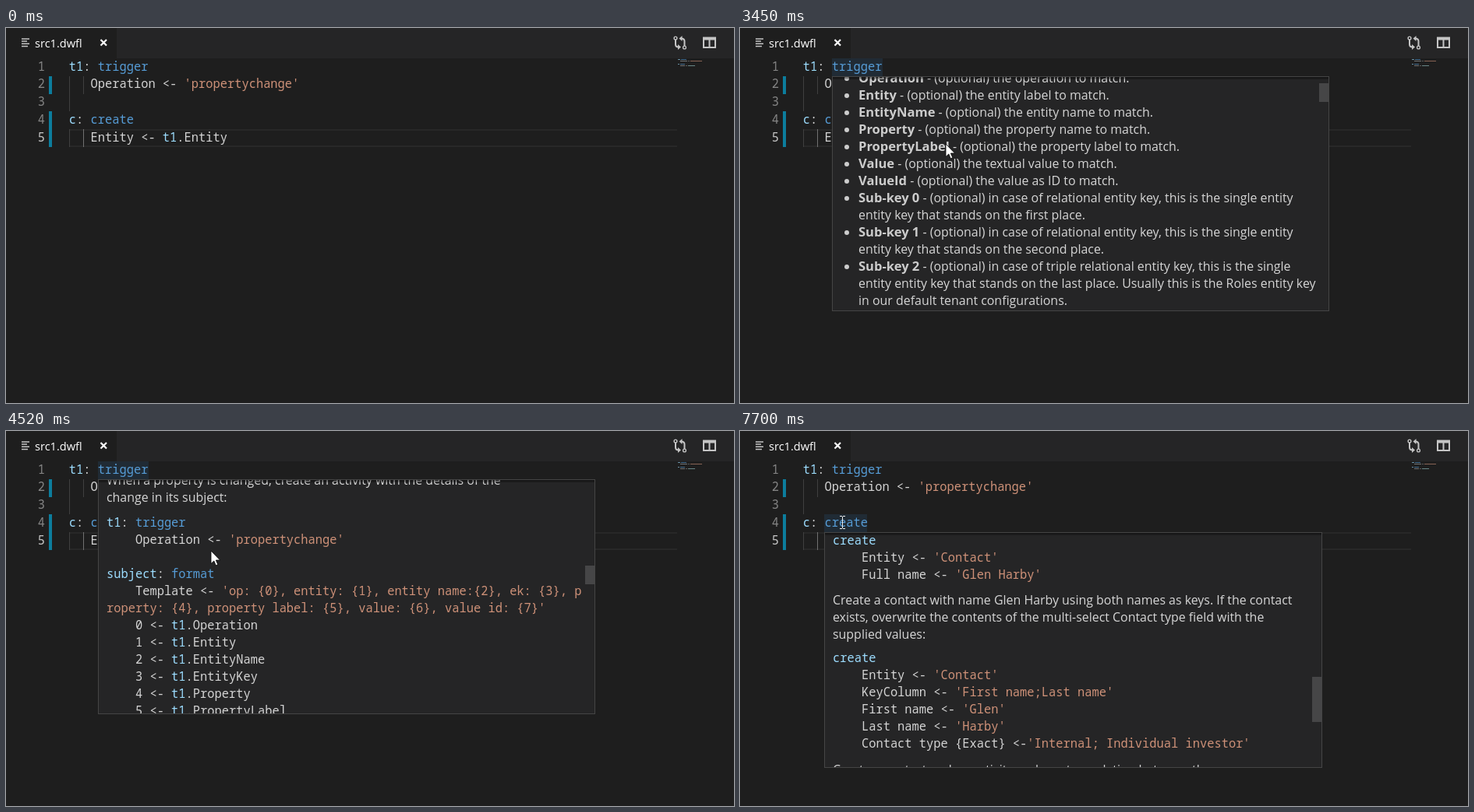
Write an HTML page that moves like this. It is 934 px wide and 482 px high and loops after 8000 ms.

```html
<!DOCTYPE html>
<html lang="en">
<head>
<meta charset="utf-8">
<title>Hover documentation</title>
<style>
html, body { margin: 0; width: 100%; height: 100%; overflow: hidden; background: #1e1e1e; }
#stage { position: relative; width: 934px; height: 482px; overflow: hidden; background: #1e1e1e; }
#stage div, #stage svg { position: absolute; }
.code { font: 500 15.4px/22px "Noto Sans Mono", monospace; color: #d4d4d4; white-space: pre; }
.row { line-height: 22.8px; }
.num { left: 20px; width: 30px; text-align: right; font-weight: 400; color: #858585; }
.num.on { color: #c6c6c6; }
.v { color: #9cdcfe; }
.k { color: #569cd6; }
.s { color: #ce9178; }
.ui { font: 15.93px/22px "Open Sans", "Noto Sans", sans-serif; color: #d6d6d6; white-space: pre; }
.ui b { font-size: 1.04em; line-height: 1; color: #ccc; }
.head { font-size: 18.4px; font-weight: 700; color: #ccc; }
.tab { left: 37px; top: 8px; font-size: 14.6px; color: #fff; }
.pop { box-sizing: border-box; background: #252526; border: 1px solid #454545; overflow: hidden; }
.shade { left: 0; top: 0; right: 0; height: 3px; box-shadow: #000 0 6px 6px -6px inset; }
.thumb { width: 12px; background: rgba(121, 121, 121, .4); }
.dot { width: 6px; height: 6px; border-radius: 50%; background: #ccc; }
</style>
</head>
<body>
<div id="stage"></div>
<script>
const LOOP = 8000, TICK = 76.6, ROW = 22.8;
const stage = document.getElementById('stage');

function add(parent, cls, style, html = '') {
  const el = document.createElement('div');
  el.className = cls;
  for (const key in style) {
    const val = style[key];
    el.style[key] = typeof val === 'number' ? val + 'px' : val;
  }
  el.innerHTML = html;
  parent.append(el);
  return el;
}

const box = (left, top, width, height, background) =>
  add(stage, '', { left, top, width, height, background });

const span = (cls, text) => `<span class="${cls}">${text}</span>`;

// A leading ~ marks the rest of a string wrapped from the line above.
function paint(line) {
  if (line[0] === '~') return span('s', line.slice(1));
  return line.replace(/'[^']*'?|^\w+(: \w+)?|\w+(?=\.)|<-/g, m => {
    if (m === '<-') return '&lt;-';
    if (m[0] === "'") return span('s', m);
    const [name, word] = m.split(': ');
    return span('v', name) + (word ? ': ' + span('k', word) : '');
  });
}

const bold = text => text.replace(/\*(.+?)\*/g, '<b>$1</b>');

// Editor
box(0, 0, 934, 39, '#252526');
box(0, 0, 142, 39, '#1e1e1e');
add(stage, 'ui tab', {}, 'src1.dwfl');
stage.insertAdjacentHTML('beforeend', `
<svg width="934" height="39" fill="none" stroke="#c5c5c5" stroke-width="2">
  <path d="M20 14H30M20 17H27M20 20.2H30M20 23.4H28" stroke-width="1.5"/>
  <path d="M121.5 15L129 22.5M129 15L121.5 22.5" stroke="#fff" stroke-width="2.2"/>
  <circle cx="859" cy="13" r="1.9" stroke-width="1.4"/>
  <circle cx="870.5" cy="25" r="1.9" stroke-width="1.4"/>
  <path d="M859 15V21Q859 24.5 863 24.5M870.5 23V17Q870.5 13.5 866.5 13.5"/>
  <path d="M862 21V28L866 24.5ZM867.5 10V17L863.5 13.5Z" fill="#c5c5c5" stroke="none"/>
  <path d="M895 13V25H910V13M902.5 13V25"/>
  <path d="M894 13.5H911" stroke-width="4"/>
</svg>`);

const wordA = box(118, 39, 65, 23, 'rgba(38,79,120,.25)');
const wordB = box(108, 107, 55, 23, 'rgba(38,79,120,.25)');

box(81, 130, 780, 2, '#282828');
box(81, 151, 780, 2, '#282828');
box(55, 62, 4, 23, '#0c7d9d');
box(55, 107, 4, 46, '#0c7d9d');
box(81, 62, 1, 45, '#404040');
box(81, 130, 1, 23, '#404040');
box(99, 62, 1, 23, '#404040');
box(99, 130, 1, 23, '#707070');

const source = [
  't1: trigger',
  "   Operation <- 'propertychange'",
  '',
  'c: create',
  '   Entity <- t1.Entity'
];
source.forEach((line, i) => {
  const top = 38.5 + i * ROW;
  add(stage, 'code row num' + (i === 4 ? ' on' : ''), { top }, i + 1);
  add(stage, 'code row', { left: 80.8, top }, paint(line));
});

// Minimap: one pixel per character
const mini = (x, row, w, color) => { box(862 + x, 40 + row * 2, w, 1, color).style.opacity = .6; };
mini(0, 0, 3, '#9cdcfe'); mini(4, 0, 7, '#569cd6');
mini(3, 1, 9, '#aaa'); mini(13, 1, 2, '#888'); mini(16, 1, 15, '#ce9178');
mini(0, 3, 2, '#9cdcfe'); mini(3, 3, 6, '#569cd6');
mini(3, 4, 6, '#aaa'); mini(10, 4, 2, '#888'); mini(13, 4, 9, '#9cc');

// Hover panels: blocks are [centre of first line, kind, text]
function makePanel(left, top, width, height, blocks, thumbH) {
  const el = add(stage, 'pop', { left, top, width, height });
  const page = add(el, '', { left: 0, top: 0, width: width - 2 });
  for (const [y, kind, text] of blocks) {
    const isCode = kind === 'code';
    text.split('\n').forEach((line, i) => {
      const lineTop = y - top - (isCode ? 11.5 : 13) + i * 22;
      const bullet = line[0] === '-';
      if (bullet) add(page, 'dot', { left: 15, top: lineTop + 9 });
      add(page, isCode ? 'code' : 'ui ' + kind,
        { left: kind === 'list' ? 33 : 10, top: lineTop },
        isCode ? paint(line) : bold(bullet ? line.slice(1) : line));
    });
  }
  const shade = add(el, 'shade', {});
  const thumb = add(el, 'thumb', { left: width - 14, top: 0, height: thumbH });
  return { el, page, shade, thumb };
}

const triggerDoc = [
  [73, 'text', `Starts the execution of the workflow when a change in the data occurs. The
arguments below narrow the changes that start the logic.`],
  [133, 'head', 'Arguments'],
  [169, 'list', `-*Operation* - (optional) the operation to match.
-*Entity* - (optional) the entity label to match.
-*EntityName* - (optional) the entity name to match.
-*Property* - (optional) the property name to match.
-*PropertyLabel* - (optional) the property label to match.
-*Value* - (optional) the textual value to match.
-*ValueId* - (optional) the value as ID to match.
-*Sub-key 0* - (optional) in case of relational entity key, this is the single entity
entity key that stands on the first place.
-*Sub-key 1* - (optional) in case of relational entity key, this is the single entity
entity key that stands on the second place.
-*Sub-key 2* - (optional) in case of triple relational entity key, this is the single
entity entity key that stands on the last place. Usually this is the Roles entity key
in our default tenant configurations.`],
  [497, 'head', 'Result'],
  [538, 'text', 'The step returns the details of the change:'],
  [570, 'list', `-*Operation* - the operation that was executed.
-*Entity* - the label of the affected entity.
-*EntityName* - the name of the affected entity.
-*EntityKey* - the key of the affected entity.
-*Property* - the name of the changed property.
-*PropertyLabel* - the label of the changed property.
-*Value* - the textual value of the property.
-*ValueId* - the value of the property as ID.`],
  [766, 'head', 'Remarks'],
  [807, 'text', `The *Operation* argument accepts one of the following values:`],
  [839, 'list', `-*create* - a new entity is created.
-*propertychange* - a property of the entity is changed.
-*delete* - an existing entity is deleted.`],
  [927, 'text', `When no arguments are given, the logic will be executed on every change of
any entity.`],
  [993, 'text', 'All of the given arguments have to match the change.'],
  [1026, 'text', `You can use the *Sub-key 0*, *Sub-key 1* and *Sub-key 2* arguments to designate a
logic that will be executed only when certain entity is affected.`],
  [1089, 'head', 'Examples'],
  [1130, 'text', 'When new contact is created, send email with the name of the contact:'],
  [1161, 'code', `trigger
   Operation <- 'create'
   Entity <- 'Contact'

fetch
    Entity <- 'Contact'
    Internal ID <- trigger.EntityKey

email
    Subject <- 'New contact'
    Body <- fetch.Name`],
  [1444, 'text', `When a property is changed, create an activity with the details of the
change in its subject:`],
  [1497, 'code', `t1: trigger
    Operation <- 'propertychange'

subject: format
    Template <- 'op: {0}, entity: {1}, entity name:{2}, ek: {3}, p
~roperty: {4}, property label: {5}, value: {6}, value id: {7}'
    0 <- t1.Operation
    1 <- t1.Entity
    2 <- t1.EntityName
    3 <- t1.EntityKey
    4 <- t1.Property
    5 <- t1.PropertyLabel
    6 <- t1.Value
    7 <- t1.ValueId

c1: create
    Entity <- 'Activity'
    Subject <- subject.Result`],
  [1904, 'text', 'When a contact is deleted, create an activity:'],
  [1935, 'code', `trigger
    Operation <- 'delete'
    Entity <- 'Contact'

create
    Entity <- 'Activity'`]
];

const createDoc = [
  [140.5, 'code', `create
    Entity <- 'Contact'
    Full name <- 'Glen Harby'`],
  [218, 'text', `Create a contact with name Glen Harby using both names as keys. If the contact
exists, overwrite the contents of the multi-select Contact type field with the
supplied values:`],
  [291.5, 'code', `create
    Entity <- 'Contact'
    KeyColumn <- 'First name;Last name'
    First name <- 'Glen'
    Last name <- 'Harby'
    Contact type {Exact} <-'Internal; Individual investor'`],
  [436, 'text', 'Create a contact and an activity and create a relation between them:']
];

const panelA = makePanel(118, 62, 638, 302, triggerDoc, 24);
const panelB = makePanel(108, 130, 639, 303, createDoc, 58);
panelB.thumb.style.top = '185px';

// Pointers
const beam = add(stage, '', { left: 0, top: 0 }, `<svg width="9" height="18" style="left:-4px;top:-8px">
  <path d="M1 .5H4M5 .5H8M4.5 1V16M1 16.5H4M5 16.5H8" stroke="#eee" fill="none"/></svg>`);
const arrow = add(stage, '', { left: 0, top: 0 }, `<svg width="14" height="22" style="left:-1px;top:-1px">
  <path d="M1 1V17.5L4.8 14L7.2 19.8L9.8 18.7L7.4 13H12.6Z" fill="#fff" stroke="#000" stroke-width=".8"/></svg>`);

const smooth = k => k * k * (3 - 2 * k);
const easeOut = k => 1 - (1 - k) ** 3;

// [start, steps, from, bend, to, easing]
const moves = [
  [530, 11, [770, 430], [560, 290], [307, 143], smooth],
  [1370, 7, [307, 143], [230, 95], [157, 53], smooth],
  [3220, 6, [157, 53], [280, 80], [263, 154], easeOut],
  [5760, 5, [263, 154], [520, 215], [800, 251], smooth],
  [6142, 6, [800, 251], [850, 254], [740, 239], smooth],
  [6620, 11, [740, 239], [400, 68], [131, 117], smooth]
];

// [time, scroll offset]
const scrolls = [
  [0, 0], [3449, 104], [3530, 310], [3600, 520], [3830, 670], [3910, 810],
  [4140, 953], [4220, 1090], [4450, 1240], [4520, 1380], [5380, 1518], [5460, 1660]
];

const latest = (table, t) => table.filter(entry => entry[0] <= t).pop();
const show = (el, on) => { el.style.visibility = on ? 'inherit' : 'hidden'; };

function pointerAt(t) {
  const move = latest(moves, t);
  if (!move) return null;
  const [start, steps, from, bend, to, ease] = move;
  const step = Math.min(steps, Math.floor((t - start) / TICK) + 1);
  const k = ease(step / steps), r = 1 - k;
  return from.map((a, i) => Math.round(r * r * a + 2 * r * k * bend[i] + k * k * to[i]));
}

function fade(panel, word, t, from, to) {
  const on = t >= from && t < to;
  show(panel.el, on);
  show(word, on);
  panel.el.style.opacity = t < from + 80 ? .5 : 1;
  return on;
}

function draw(t) {
  const open = fade(panelA, wordA, t, 2140, 6066);
  fade(panelB, wordB, t, 7620, LOOP);

  const scroll = latest(scrolls, t)[1];
  panelA.page.style.transform = `translateY(${-scroll}px)`;
  panelA.thumb.style.top = Math.round(scroll * .0797) + 'px';
  show(panelA.thumb, open && (t < 2990 || t >= 3220));
  show(panelA.shade, open && scroll > 0);

  const at = pointerAt(t);
  const overPanel = open && t >= 3220;
  show(beam, at && !overPanel);
  show(arrow, at && overPanel);
  if (at) beam.style.transform = arrow.style.transform = `translate(${at[0]}px, ${at[1]}px)`;
}

function loop() {
  draw(performance.now() % LOOP);
  requestAnimationFrame(loop);
}
loop();
</script>
</body>
</html>
```
